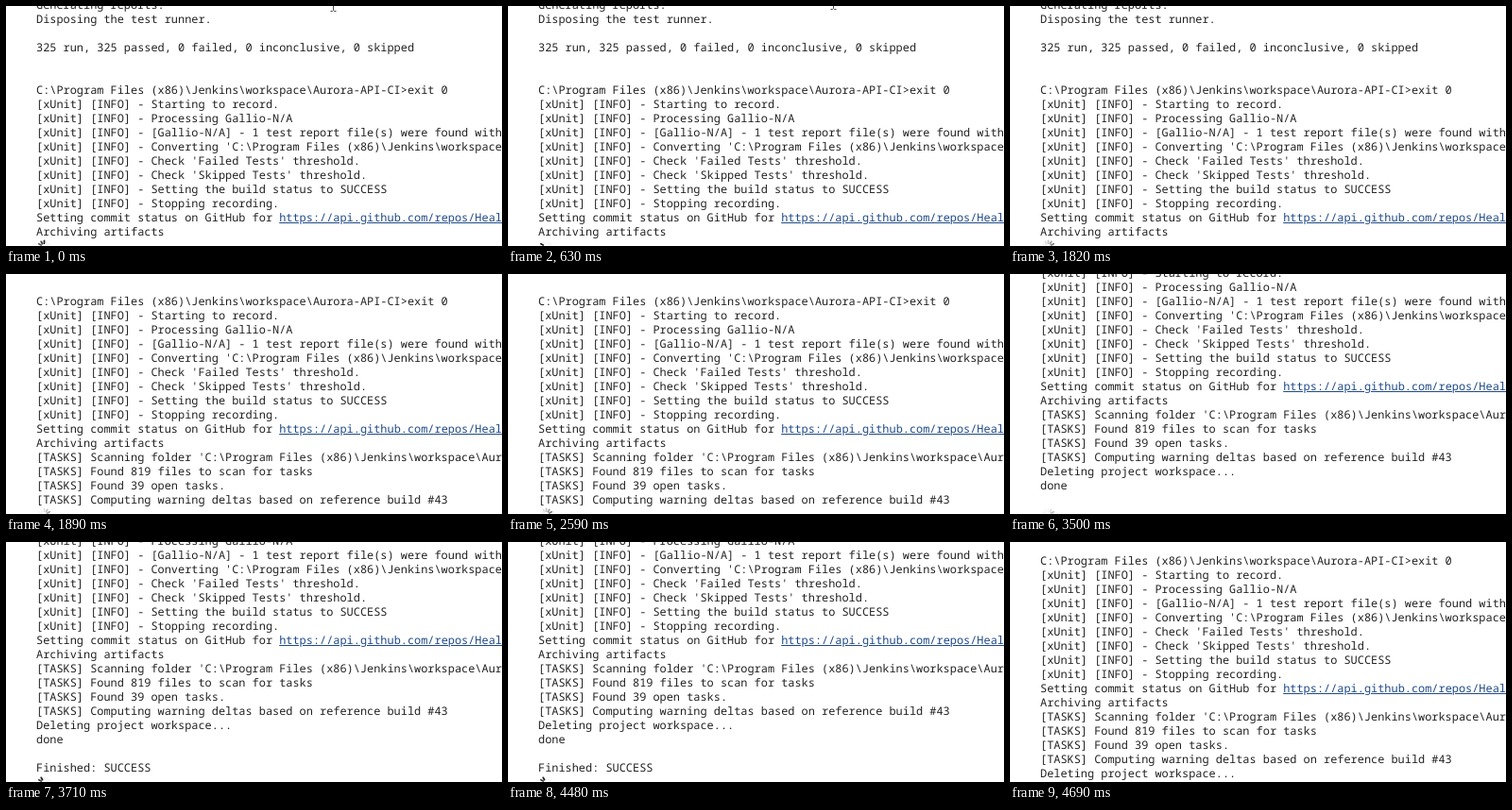
Write an HTML page that moves like this. It is 525 by 254 pixels and loops after 7560 ms.

```html
<!DOCTYPE html>
<html lang="en">
<head>
<meta charset="utf-8">
<title>Build console</title>
<style>
html, body { margin: 0; width: 100%; height: 100%; overflow: hidden; background: #fff; }
#stage { position: absolute; left: 0; top: 0; width: 525px; height: 254px; overflow: hidden; }
#log {
  position: absolute; left: 32px; top: -8px; margin: 0; color: #222;
  font: 11.912px/15px "Noto Sans Mono", "DejaVu Sans Mono", monospace;
  text-rendering: geometricPrecision; font-variant-ligatures: none;
}
#log div { height: 15px; }
#log u { color: #204a87; }
svg { position: absolute; left: 0; top: 0; }
</style>
</head>
<body>
<div id="stage">
<pre id="log"></pre>
<svg width="525" height="254">
  <g id="spinner" stroke-width="1.7" stroke-linecap="round"></g>
  <path id="cursor" d="M-3 5.5h2l1-1 1 1h2M0 4.5V-6" fill="none" stroke="#444"/>
</svg>
</div>
<script>
const LOOP = 7560, STEP = 70, SPOKES = 12, TURN = 760;
const el = id => document.getElementById(id);
const log = el('log'), spinner = el('spinner'), cursor = el('cursor');

const lines = String.raw`Generating reports.
Disposing the test runner.

325 run, 325 passed, 0 failed, 0 inconclusive, 0 skipped


C:\Program Files (x86)\Jenkins\workspace\Aurora-API-CI>exit 0
[xUnit] [INFO] - Starting to record.
[xUnit] [INFO] - Processing Gallio-N/A
[xUnit] [INFO] - [Gallio-N/A] - 1 test report file(s) were found with
[xUnit] [INFO] - Converting 'C:\Program Files (x86)\Jenkins\workspace
[xUnit] [INFO] - Check 'Failed Tests' threshold.
[xUnit] [INFO] - Check 'Skipped Tests' threshold.
[xUnit] [INFO] - Setting the build status to SUCCESS
[xUnit] [INFO] - Stopping recording.
Setting commit status on GitHub for https://api.github.com/repos/Heal
Archiving artifacts
[TASKS] Scanning folder 'C:\Program Files (x86)\Jenkins\workspace\Aur
[TASKS] Found 819 files to scan for tasks
[TASKS] Found 39 open tasks.
[TASKS] Computing warning deltas based on reference build #43
Deleting project workspace...
done

Finished: SUCCESS`.split('\n');

const rows = lines.map(text => {
  const row = log.appendChild(document.createElement('div'));
  const [plain, url] = text.split(/(?=https:)/);
  row.textContent = plain;
  if (url) row.appendChild(document.createElement('u')).textContent = url;
  return row;
});

// start time, scroll offset, visible line count
const views = [[0, 0, 17], [1890, 60, 21], [2800, 105, 24], [3710, 120, 25], [4690, 69, 25]];

const spokes = Array.from({ length: SPOKES }, (_, i) => {
  const line = document.createElementNS('http://www.w3.org/2000/svg', 'line');
  const a = i / SPOKES * 2 * Math.PI, x = Math.sin(a), y = -Math.cos(a);
  const ends = { x1: 40.5 + 3.8 * x, y1: 255 + 3.8 * y, x2: 40.5 + 6.6 * x, y2: 255 + 6.6 * y };
  for (const k in ends) line.setAttribute(k, ends[k]);
  return spinner.appendChild(line);
});

function draw(now) {
  const t = Math.floor(now % LOOP / STEP) * STEP;
  const [, scroll, count] = views.filter(v => v[0] <= t).pop();
  log.style.transform = `translateY(${-scroll}px)`;
  rows.forEach((row, i) => row.style.visibility = i < count ? 'visible' : 'hidden');

  spinner.style.display = t < 4690 ? '' : 'none';
  const head = Math.round(t / TURN * SPOKES) % SPOKES;
  spokes.forEach((spoke, i) => {
    const age = (head - i + SPOKES) % SPOKES;
    const grey = Math.min(245, 30 + age * 32);
    spoke.setAttribute('stroke', `rgb(${grey},${grey},${grey})`);
  });

  const move = Math.min(1, t / 350);
  cursor.style.display = t < 1680 ? '' : 'none';
  cursor.setAttribute('transform', `translate(${346.5 - Math.round(move * 2)} ${-Math.round(move * 2)})`);
}

const start = performance.now();
(function tick() {
  draw(performance.now() - start);
  requestAnimationFrame(tick);
})();
</script>
</body>
</html>
```
